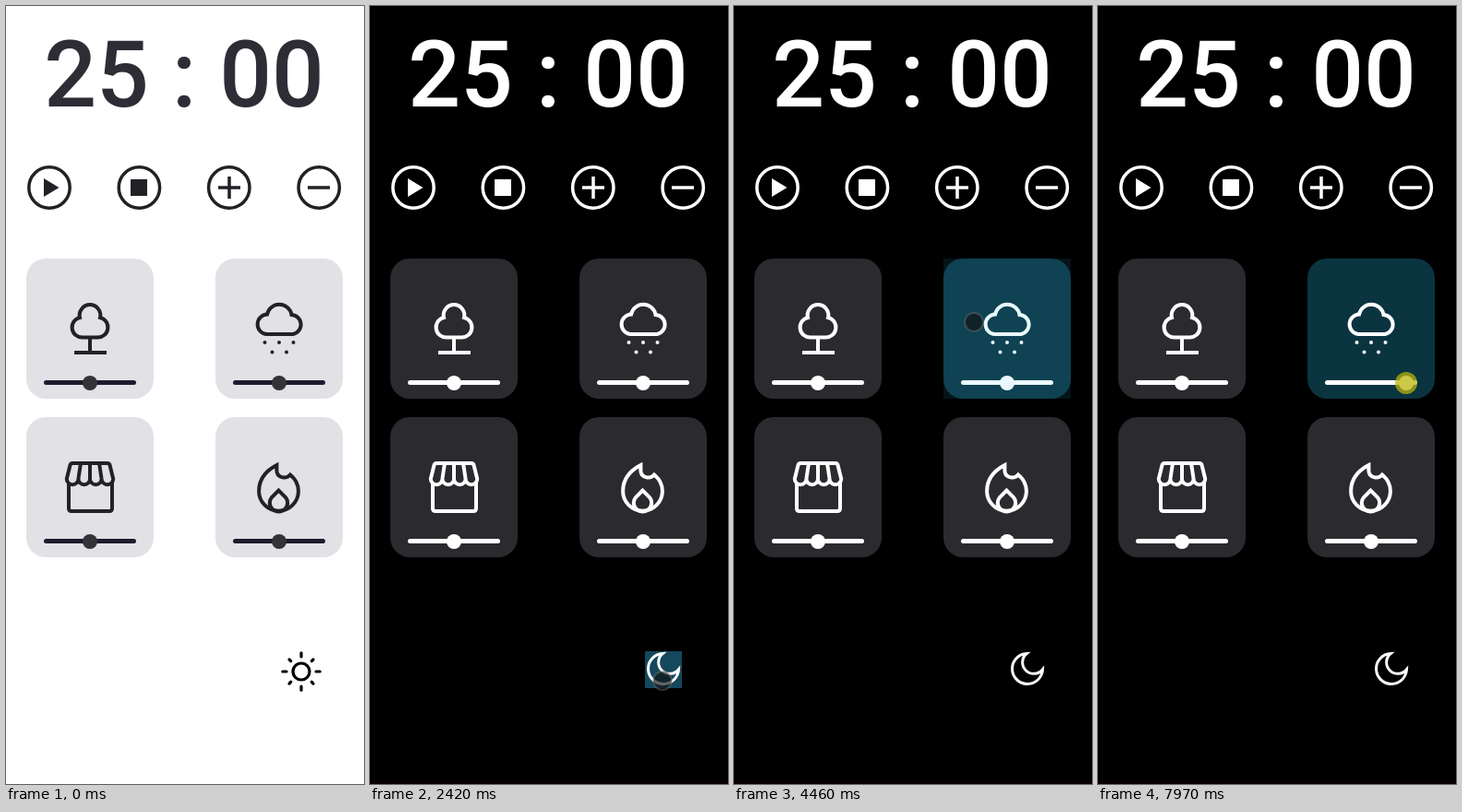
Animation, 388 px wide and 844 px high, one loop 8000 ms. Source, as an HTML page:

```html
<!DOCTYPE html>
<html lang="en">
<head>
<meta charset="utf-8">
<title>Focus timer</title>
<style>
  html, body { margin: 0; height: 100%; overflow: hidden; background: #fff; }
  svg {
    display: block; width: 388px; height: 844px; background: var(--page);
    --page: #fff; --ink: #222126; --digits: #2e2d35; --card: #e2e1e6; --track: #1f1b2e; --knob: #343338;
  }
  svg.dark { --page: #000; --ink: #fff; --digits: #fff; --card: #2b2a2e; --track: #fff; --knob: #fff; }
  .time { font: 500 100px Roboto, sans-serif; fill: var(--digits); text-anchor: middle; white-space: pre; }
  .line { fill: none; stroke: var(--ink); stroke-width: 4; }
  .button { stroke-width: 3.5; }
  .drops { stroke-linecap: round; stroke-dasharray: 0 15.5; }
  .solid { fill: var(--ink); }
  .card { fill: var(--card); }
  .card.on { fill: #0b3441; }
  .track { stroke: var(--track); stroke-width: 5; stroke-linecap: round; }
  .knob { fill: var(--knob); }
  .sun { fill: none; stroke: #000; stroke-width: 3.2; stroke-linecap: round; }
  .moon { fill: none; stroke: #fff; stroke-width: 3; }
  .dark .sun, svg:not(.dark) .night { display: none; }
  .tap { fill: #33b5e5; }
</style>
</head>
<body>
<svg id="stage" viewBox="0 0 388 844">
  <rect class="night" y="840" width="388" height="4" fill="#080005"/>
  <text class="time" x="193" y="109">25 : 00</text>

  <g id="buttons">
    <path class="solid" d="M41 187 L57.5 197 L41 207 Z M135 188 h18 v18 h-18 Z"/>
    <path class="line button" d="M230 197 h24 M242 185 v24 M327 197 h24"/>
  </g>

  <g id="cards"></g>

  <g class="line">
    <path d="M83 359.5 A10.9 10.9 0 0 1 80 338 A11.3 11.3 0 1 1 102 338 A10.9 10.9 0 0 1 99 359.5 Z M91 359 V376 M74 376 H109"/>
    <path d="M282 356 A10.8 10.8 0 0 1 283 334.5 A13.5 13.5 0 0 1 309.5 335 A10.6 10.6 0 0 1 311 356 Z"/>
    <path class="drops" d="M280.5 365 h32"/>
    <path class="drops" d="M288.5 375.5 h17"/>
    <path id="awning"/>
    <path d="M81 496 L78.4 513 M91 496 V513 M101 496 L103.6 513 M68 517 V545 q0 3 3 3 H112 q3 0 3 -3 V517"/>
    <path d="M293.4 498 V504 C293.4 511.5 303.5 514 308 508.5 C313.5 513 316.9 519 316.9 526.3 A21.4 21.4 0 0 1 274.1 526.3 C274.1 514 281 504.5 293.4 498 Z"/>
    <path d="M295.5 525.5 L288 533 Q285.8 535.5 285.8 538.8 A9.7 9.7 0 0 0 305.2 538.8 Q305.2 535.5 303 533 Z"/>
  </g>

  <rect class="tap" id="themeTap" x="298" y="700" width="40" height="40"/>
  <rect class="tap" id="rainTap" x="227" y="274" width="138" height="152"/>

  <g class="sun" id="sun"><circle cx="320" cy="722" r="9"/></g>
  <path class="moon night" d="M317.2 702.5 A12.3 12.3 0 1 0 334.5 719.8 A16.5 16.5 0 1 1 317.2 702.5 Z"/>

  <g id="pointer">
    <circle id="hover" r="10" fill="#111" fill-opacity=".65" stroke="#777" stroke-opacity=".4" stroke-width="2"/>
    <circle id="press" r="12" fill="#bab50a" fill-opacity=".74"/>
  </g>
</svg>

<script>
const LOOP = 8000;
const THEME_PRESS = 2290, RAIN_PRESS = 4270, TAP_LENGTH = 130, DRAG_START = 6050;
const $ = id => document.getElementById(id);

function add(parent, tag, attrs) {
  const el = document.createElementNS('http://www.w3.org/2000/svg', tag);
  for (const name in attrs) el.setAttribute(name, attrs[name]);
  return parent.appendChild(el);
}

for (let i = 0; i < 4; i++)
  add($('buttons'), 'circle', { class: 'line button', cx: 47 + i * 97.4, cy: 197, r: 22.2 });

function addCard(x, y) {
  const box = add($('cards'), 'rect', { class: 'card', x, y, width: 138, height: 152, rx: 21 });
  add($('cards'), 'path', { class: 'track', d: `M${x + 21.5} ${y + 134.5} h95` });
  const knob = add($('cards'), 'circle', { class: 'knob', cx: x + 69, cy: y + 135, r: 8 });
  return { box, knob };
}
addCard(22, 274);
addCard(22, 446);
addCard(227, 446);
const rain = addCard(227, 274);

const scallop = 'a6.3 6.3 0 0 1 -12.6 0 ';
$('awning').setAttribute('d', `M72 496 H110 q2 0 2.500 2 L116.200 513 ${scallop.repeat(4)} L69.500 498 q.5 -2 2.500 -2 Z`);

for (let i = 0; i < 8; i++) {
  const length = i % 2 ? 2.4 : 4.2;
  add($('sun'), 'path', { d: `M320 706 v${-length}`, transform: `rotate(${i * 45} 320 722)` });
}

// Pointer moves: start time, end time, destination
const moves = [
  [390, 450, 306, 813],
  [600, 910, 312, 742],
  [1120, 1500, 317, 732],
  [2980, 3410, 283, 344],
  [3690, 4070, 260, 343],
  [4940, 5380, 316, 430],
  [5470, 5780, 303, 410],
  [DRAG_START, 6310, 315, 411],
  [6460, 6710, 329, 410],
  [7050, 7240, 334, 409]
];

const smooth = u => u * u * (3 - 2 * u);

function pointerAt(t) {
  let x = 312, y = 829;
  for (const [start, end, toX, toY] of moves) {
    const k = smooth(Math.min(1, Math.max(0, (t - start) / (end - start))));
    x += (toX - x) * k;
    y += (toY - y) * k;
  }
  return [x, y];
}

const show = (el, on) => el.setAttribute('visibility', on ? 'visible' : 'hidden');
const isTap = age => age >= 0 && age < TAP_LENGTH;

// Highlight after a tap is released, dropping off in two steps
function setHighlight(el, age) {
  el.setAttribute('opacity', age < 0 || age >= 130 ? 0 : age < 60 ? 0.4 : 0.1);
}

function draw(t) {
  const [x, y] = pointerAt(t);
  const dragging = t >= DRAG_START;
  const pressed = dragging || isTap(t - THEME_PRESS) || isTap(t - RAIN_PRESS);
  const sinceTheme = t - THEME_PRESS - TAP_LENGTH;
  const sinceRain = t - RAIN_PRESS - TAP_LENGTH;

  $('stage').classList.toggle('dark', sinceTheme >= 0);
  rain.box.classList.toggle('on', sinceRain >= 0);
  rain.knob.setAttribute('cx', dragging ? x : 296);
  setHighlight($('themeTap'), sinceTheme);
  setHighlight($('rainTap'), sinceRain);
  $('pointer').setAttribute('transform', `translate(${x} ${y})`);
  show($('hover'), t >= 390 && !pressed);
  show($('press'), pressed);
}

function tick(now) {
  draw(now % LOOP);
  requestAnimationFrame(tick);
}
draw(0);
requestAnimationFrame(tick);
</script>
</body>
</html>
```
